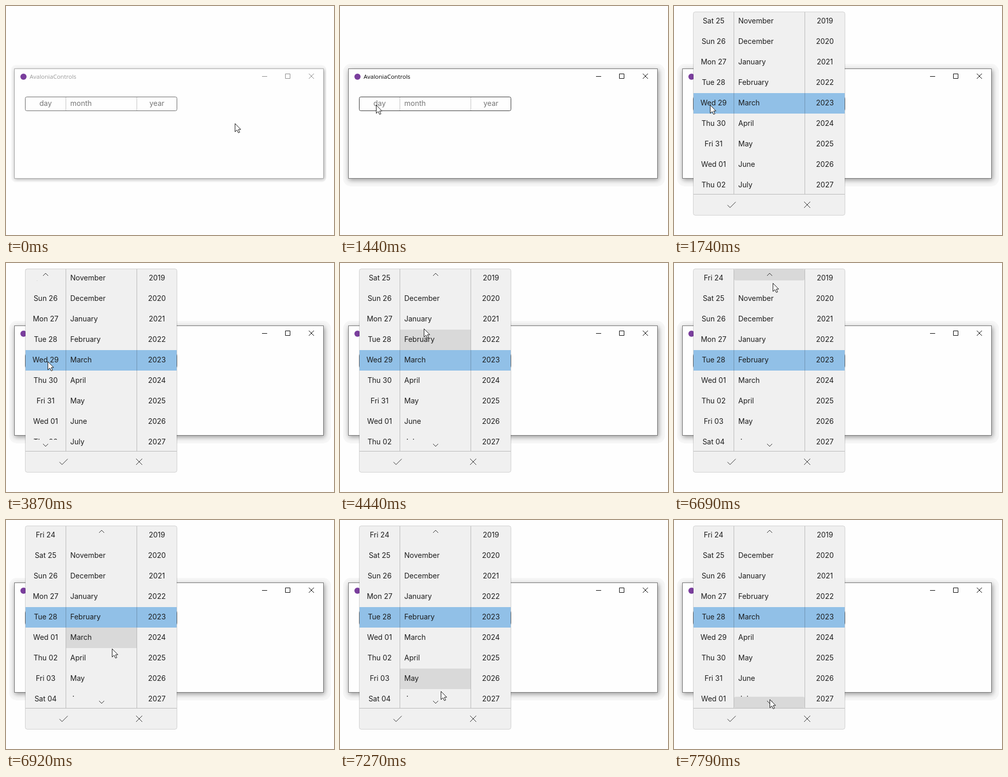
An HTML page that plays this animation: 638 by 447 pixels, repeating every 8000 ms.

```html
<!DOCTYPE html>
<html lang="en">
<head>
<meta charset="utf-8">
<title>Date picker</title>
<style>
  html, body { margin: 0; width: 100%; height: 100%; overflow: hidden; background: #fefefe; }
  svg { display: block; width: 100vw; height: 100vh; }
  text { font: 14px Inter, "Liberation Sans", sans-serif; fill: #1c1c1c; }
  .title { font: 11.5px "Open Sans", "Noto Sans", sans-serif; }
  .hint { fill: #757575; }
  .mid { text-anchor: middle; }
  .line { fill: none; stroke-width: 1; }
  .dark { stroke: #2a2a2a; }
  .rule { stroke: #000; stroke-opacity: .23; }
</style>
</head>
<body>
<svg id="stage" viewBox="0 0 638 447">
  <defs>
    <filter id="soft" x="-10%" y="-20%" width="120%" height="140%"><feGaussianBlur stdDeviation="5"/></filter>
    <filter id="faint" x="-10%" y="-20%" width="120%" height="140%"><feGaussianBlur stdDeviation="3"/></filter>
    <clipPath id="wide"><rect x="6" y="113" width="626" height="239" rx="15"/></clipPath>
    <clipPath id="tight"><rect x="10" y="115" width="613" height="229" rx="9"/></clipPath>
    <clipPath id="list"><rect x="38" y="12" width="294" height="355"/></clipPath>
  </defs>
  <rect width="638" height="447" fill="#fefefe"/>

  <g id="activeShadow" clip-path="url(#wide)">
    <rect x="6" y="113" width="626" height="239" fill="#f6f6f6"/>
    <rect x="17" y="125" width="603" height="215" fill="#000" opacity=".38" filter="url(#soft)"/>
  </g>
  <g id="idleShadow" clip-path="url(#tight)">
    <rect x="10" y="115" width="613" height="229" fill="#f7f7f7"/>
    <rect x="17" y="124" width="602" height="214" fill="#000" opacity=".34" filter="url(#faint)"/>
  </g>

  <rect id="frame" x="16.5" y="122.5" width="601" height="214" fill="#fefefe"/>
  <circle cx="34" cy="138" r="6" fill="#7a3e9d"/>
  <text id="title" class="title" x="46" y="142">AvaloniaControls</text>
  <path id="caption" class="line" d="M498 137.5h10M543.5 132.5h9v9h-9zM589 132l10 10M599 132l-10 10"/>

  <rect id="field" class="line" x="37.5" y="177.5" width="295" height="27" rx="3"/>
  <path class="line rule" d="M116.5 178v26M254.5 178v26"/>
  <text class="hint mid" x="77" y="195">day</text>
  <text class="hint" x="125" y="195">month</text>
  <text class="hint mid" x="293.5" y="195">year</text>

  <g id="popup">
    <rect x="38" y="12" width="294" height="396" rx="4" fill="#f0f0f0"/>
    <g clip-path="url(#list)">
      <rect id="hoverRow" height="40" fill="#d9d9d9"/>
      <rect x="38" y="170" width="294" height="40" fill="#91c0e7"/>
      <g id="cells"></g>
      <g id="arrows">
        <rect id="upBack" y="12" height="22" fill="#f0f0f0"/>
        <rect id="downBack" y="345" height="22" fill="#f0f0f0"/>
        <rect id="upButton" y="12" height="22" rx="3"/>
        <rect id="downButton" y="345" height="22" rx="3"/>
        <path id="chevrons" class="line dark" d="M-5 25l5-5 5 5M-5 353l5 5 5-5"/>
      </g>
    </g>
    <path class="line rule" d="M116.5 12v355M254.5 12v355M38 367.5h294"/>
    <path class="line dark" d="M104 388.5l5 5 11-11M253 382l12 12M265 382l-12 12"/>
    <rect class="line" x="37.5" y="11.5" width="295" height="397" rx="4" stroke="#000" stroke-opacity=".18"/>
  </g>

  <path id="cursor" d="M.5.5V16.5L4.3 13 7 18.6 9.6 17.5 7 12H11.7z" fill="#fff" stroke="#111"/>
</svg>
<script>
const LOOP = 8000;
const ACTIVATE = 1440, OPEN = 1740, POINTER = 3870;
const DAYS = ["Sun", "Mon", "Tue", "Wed", "Thu", "Fri", "Sat"];
const MONTHS = ["January", "February", "March", "April", "May", "June", "July",
  "August", "September", "October", "November", "December"];
const COLUMNS = [{ x: 38, w: 78, mid: 77 }, { x: 117, w: 137, mid: 186 }, { x: 255, w: 77, mid: 293.5 }];

// Selected date from each moment on; months count from 0.
const PICKS = [
  { at: 0, month: 2, day: 29 },
  { at: 5770, month: 1, day: 28 },
  { at: 7670, month: 2, day: 28 }
];
const PRESSES = [[5710, 5880], [7610, 7790]];

const $ = id => document.getElementById(id);
const set = (id, attrs) => {
  for (const name in attrs) $(id).setAttribute(name, attrs[name]);
};
const show = (id, on) => set(id, { display: on ? "inline" : "none" });
const mix = (a, b, u) => a.map((v, i) => v + (b[i] - v) * u);

const arc = (a, c, b) => u => mix(mix(a, c, u), mix(c, b, u), u);
const smooth = path => u => path(u * u * (3 - 2 * u));
const line = (a, b) => u => mix(a, b, u);
// Points are [step, x, y].
const through = (points, steps) => u => {
  const k = u * steps;
  const i = Math.max(1, points.findIndex(p => p[0] >= k - 1e-6));
  const [a, b] = [points[i - 1], points[i]];
  return mix(a.slice(1), b.slice(1), (k - a[0]) / (b[0] - a[0]));
};

const MOVES = [
  { start: 360, end: 950, steps: 11, path: smooth(arc([445, 229], [270, 297], [70, 193])) },
  { start: 3870, end: 4670, steps: 15, path: arc([70, 193], [152, 193], [183, 73]) },
  { start: 4800, end: 5090, steps: 5, path: line([183, 73], [185, 23]) },
  { start: 6690, end: 7440, steps: 14, path: through([[0, 185, 23], [1, 192, 39], [2, 200, 110],
    [3, 205, 175], [4, 206, 222], [5, 206, 251], [8, 204, 318], [14, 187, 349]], 14) },
  { start: 7500, end: 7790, steps: 6, path: line([187, 349], [186, 350]) }
];

// The interface reacts to the pointer one step late.
function pointer(t) {
  const move = MOVES.filter(m => m.start <= t).pop();
  if (!move) return { pos: MOVES[0].path(0), seen: MOVES[0].path(0) };
  const { start, end, steps, path } = move;
  const k = Math.min(steps, Math.floor((t - start) / (end - start) * (steps - 1) + .1) + 1);
  return { pos: path(k / steps), seen: path((k < steps ? k - 1 : k) / steps) };
}

function makeCells() {
  return COLUMNS.map((col, c) => Array.from({ length: 9 }, (_, row) => {
    const cell = document.createElementNS("http://www.w3.org/2000/svg", "text");
    cell.setAttribute("x", c === 1 ? 125 : col.mid);
    cell.setAttribute("y", 34 + 40 * row);
    if (c !== 1) cell.setAttribute("class", "mid");
    return $("cells").appendChild(cell);
  }));
}
const cells = makeCells();
let shownPick;

function fillCells(pick) {
  if (pick === shownPick) return;
  shownPick = pick;
  const count = new Date(Date.UTC(2023, pick.month + 1, 0)).getUTCDate();
  for (let row = 0; row < 9; row++) {
    const offset = row - 4;
    const day = (pick.day + offset - 1 + count) % count + 1;
    const weekday = new Date(Date.UTC(2023, pick.month, day)).getUTCDay();
    cells[0][row].textContent = DAYS[weekday] + " " + String(day).padStart(2, "0");
    cells[1][row].textContent = MONTHS[(pick.month + offset + 12) % 12];
    cells[2][row].textContent = 2023 + offset;
  }
}

function drawHover(t, [x, y]) {
  const col = t >= POINTER && COLUMNS.find(c => x < c.x + c.w);
  show("arrows", col);
  show("hoverRow", false);
  if (!col) return;
  const onUp = y < 34, onDown = y >= 345;
  const pressed = PRESSES.some(([from, to]) => t >= from && t < to);
  const tint = pressed ? "#c0c0c0" : "#d9d9d9";
  const span = { x: col.x, width: col.w };
  set("upBack", span);
  set("downBack", span);
  set("upButton", { ...span, fill: onUp ? tint : "none" });
  set("downButton", { ...span, fill: onDown ? tint : "none" });
  set("chevrons", { transform: `translate(${col.mid} 0)` });
  if (!onUp && !onDown) {
    show("hoverRow", true);
    set("hoverRow", { ...span, y: 10 + 40 * Math.floor((y - 10) / 40) });
  }
}

function draw(t) {
  const { pos, seen } = pointer(t);
  const active = t >= ACTIVATE, open = t >= OPEN;
  const overField = !open && seen[0] < 333 && seen[1] >= 177 && seen[1] < 205;

  show("activeShadow", active);
  show("idleShadow", !active);
  set("frame", { stroke: active ? "#707070" : "#aaaaaa" });
  set("title", { fill: "#000", style: `fill:${active ? "#000" : "#999"}` });
  set("caption", { stroke: active ? "#000" : "#888" });
  set("field", { stroke: overField ? "#333" : "#666" });

  show("popup", open);
  fillCells(PICKS.filter(p => p.at <= t).pop());
  drawHover(t, seen);
  set("cursor", { transform: `translate(${pos.map(Math.round).join(" ")})` });
}

const begin = performance.now();
function tick() {
  draw((performance.now() - begin) % LOOP);
  requestAnimationFrame(tick);
}
tick();
</script>
</body>
</html>
```
